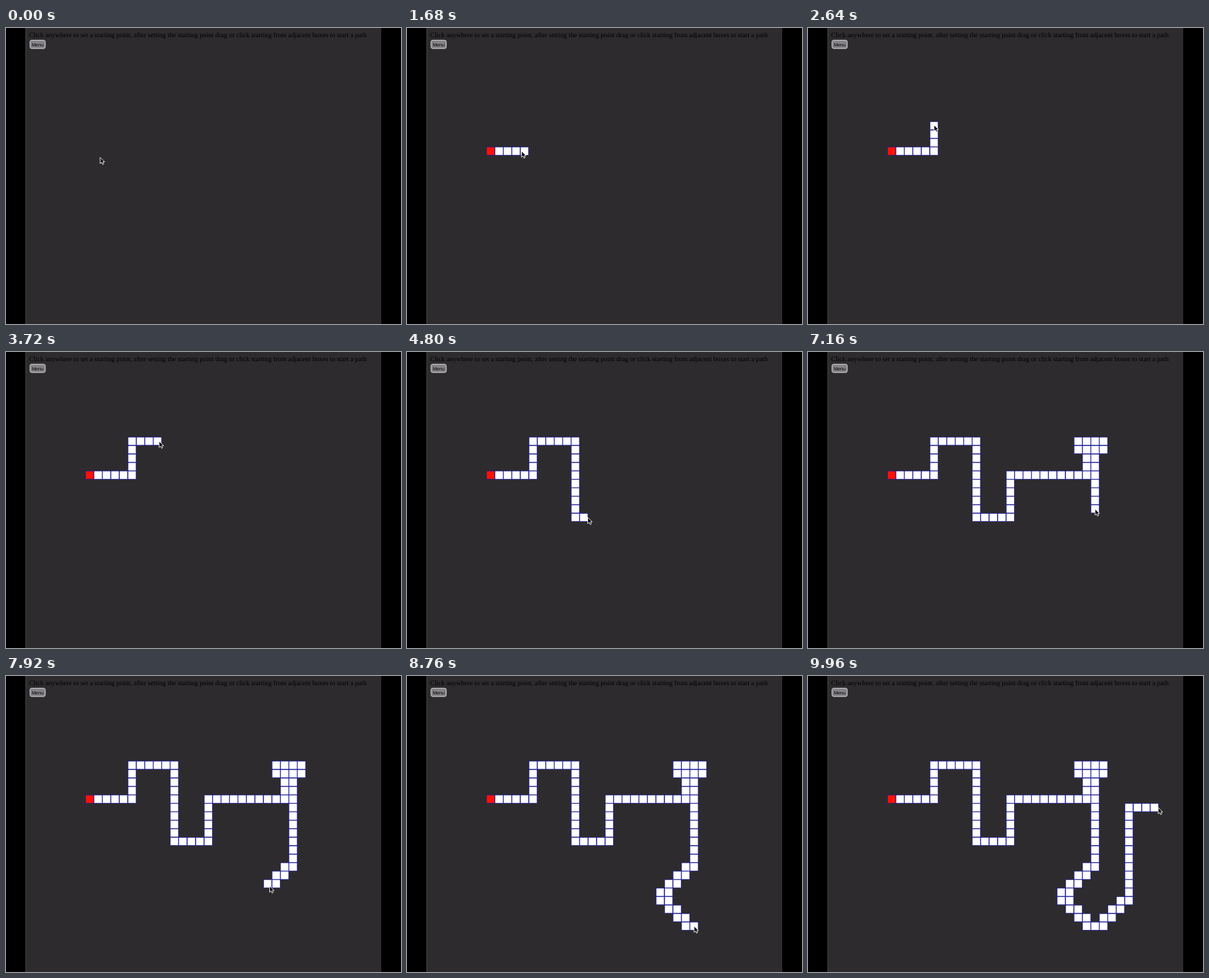
Recreate the animation shown at these times as an HTML page. Size 600 by 450 pixels, loop 10000 ms.

```html
<!DOCTYPE html>
<html lang="en">
<head>
<meta charset="utf-8">
<title>Path drawing</title>
<style>
  html, body { margin: 0; width: 100%; height: 100%; overflow: hidden; background: #000; }
  svg { display: block; width: 600px; height: 450px; }
  text { text-rendering: geometricPrecision; }
  .cell { fill: #fff; stroke: #1414a8; stroke-width: .65; }
  .start { fill: #fc1200; }
</style>
</head>
<body>
<svg viewBox="0 0 600 450">
  <rect width="600" height="450" fill="#000"/>
  <rect x="30" width="540" height="450" fill="#2d2b2e"/>
  <rect x="29.5" width="1" height="450" fill="#4a494b"/>
  <text x="35.1" y="14" font-family="'Liberation Serif', 'Times New Roman', serif" font-size="10.3">Click anywhere to set a starting point, after setting the starting point drag or click starting from adjacent boxes to start a path</text>
  <rect x="36.4" y="18.6" width="23.3" height="12.6" rx="2.6" fill="#858387" stroke="#d2d1d3"/>
  <text x="48.1" y="27.7" text-anchor="middle" font-family="'Liberation Sans', Arial, sans-serif" font-size="7.15">Menu</text>
  <g id="cells"></g>
  <path id="cursor" d="M0 0V9.4L2.2 7.4L3.7 10.7L5.4 9.9L4 6.8H6.8Z" fill="#000" stroke="#fff" stroke-width=".9" stroke-linejoin="round"/>
</svg>
<script>
const LOOP = 10000, STEP = 40, CLICK = 960;
const SIZE = 12.875, BORDER = .65, LEFT = 120.6, TOP = 180.7;

// Route over the grid: direction and number of cells
const route = 'R5 U4 R5 D9 R4 U5 R9 U3 L1 U1 R3 D1 L1 D11 ' +
  'L1 D1 '.repeat(4) + 'R1 D1 '.repeat(3) + 'R2 ' + 'U1 R1 '.repeat(3) + 'U11 R4';

// Where the hand changes speed: time, cells travelled
const pace = [
  [1160, 0], [1680, 3.65], [2240, 5], [2760, 9], [2920, 9], [3720, 12.2],
  [4000, 14.3], [5000, 27], [5880, 40.3], [7160, 58], [8760, 77], [9960, 98.45]
];

const moves = { R: [1, 0], L: [-1, 0], U: [0, -1], D: [0, 1] };
const path = [[0, 0]];
for (const run of route.split(' ')) {
  const [dx, dy] = moves[run[0]];
  for (let n = +run.slice(1); n > 0; n--) {
    const [x, y] = path[path.length - 1];
    path.push([x + dx, y + dy]);
  }
}
const last = path.length - 1;

const group = document.getElementById('cells');
const cursor = document.getElementById('cursor');
const cells = path.map(([x, y], i) => {
  const cell = document.createElementNS('http://www.w3.org/2000/svg', 'rect');
  const attrs = {
    class: i ? 'cell' : 'cell start',
    x: LEFT + x * SIZE + BORDER / 2, y: TOP + y * SIZE + BORDER / 2,
    width: SIZE - BORDER, height: SIZE - BORDER
  };
  for (const name in attrs) cell.setAttribute(name, attrs[name]);
  return group.appendChild(cell);
});

const clamp = v => Math.min(1, Math.max(0, v));
const mix = (a, b, k) => a.map((v, i) => v + (b[i] - v) * k);

function along(pos) {
  const i = Math.min(Math.floor(pos), last - 1);
  return mix(path[i], path[i + 1], pos - i);
}

// Rounds off corners of the route for the pointer
function smooth(pos) {
  const w = Math.min(.5, pos, last - pos);
  return mix(along(pos - w), along(pos + w), .5);
}

function travelled(t) {
  const next = pace.findIndex(p => p[0] > t);
  if (next < 0) return pace[pace.length - 1][1];
  if (next === 0) return 0;
  const [a, b] = [pace[next - 1], pace[next]];
  return mix(a, b, (t - a[0]) / (b[0] - a[0]))[1];
}

// The pointer twitches, rests, then glides into the first cell
function approach(t) {
  const twitch = clamp(t / 80), glide = clamp((t - 340) / 460);
  return mix([16 - 3 * twitch, 9.6 - 4 * twitch], [-4, -4], glide * glide * (3 - 2 * glide))
    .map(v => v * (1 - clamp((t - 1160) / 520)));
}

function draw(t) {
  const pos = travelled(t);
  const [x, y] = smooth(pos);
  const [dx, dy] = approach(t);
  const shown = t < CLICK ? -1 : Math.round(pos);
  cells.forEach((cell, i) => cell.style.display = i <= shown ? '' : 'none');
  const px = LEFT + (x + .5) * SIZE + dx;
  const py = TOP + (y + .5) * SIZE + dy;
  cursor.setAttribute('transform', `translate(${px.toFixed(2)} ${py.toFixed(2)})`);
}

const begin = performance.now();
function tick() {
  const t = (performance.now() - begin) % LOOP;
  draw(Math.floor(t / STEP) * STEP);
  requestAnimationFrame(tick);
}
tick();
</script>
</body>
</html>
```
